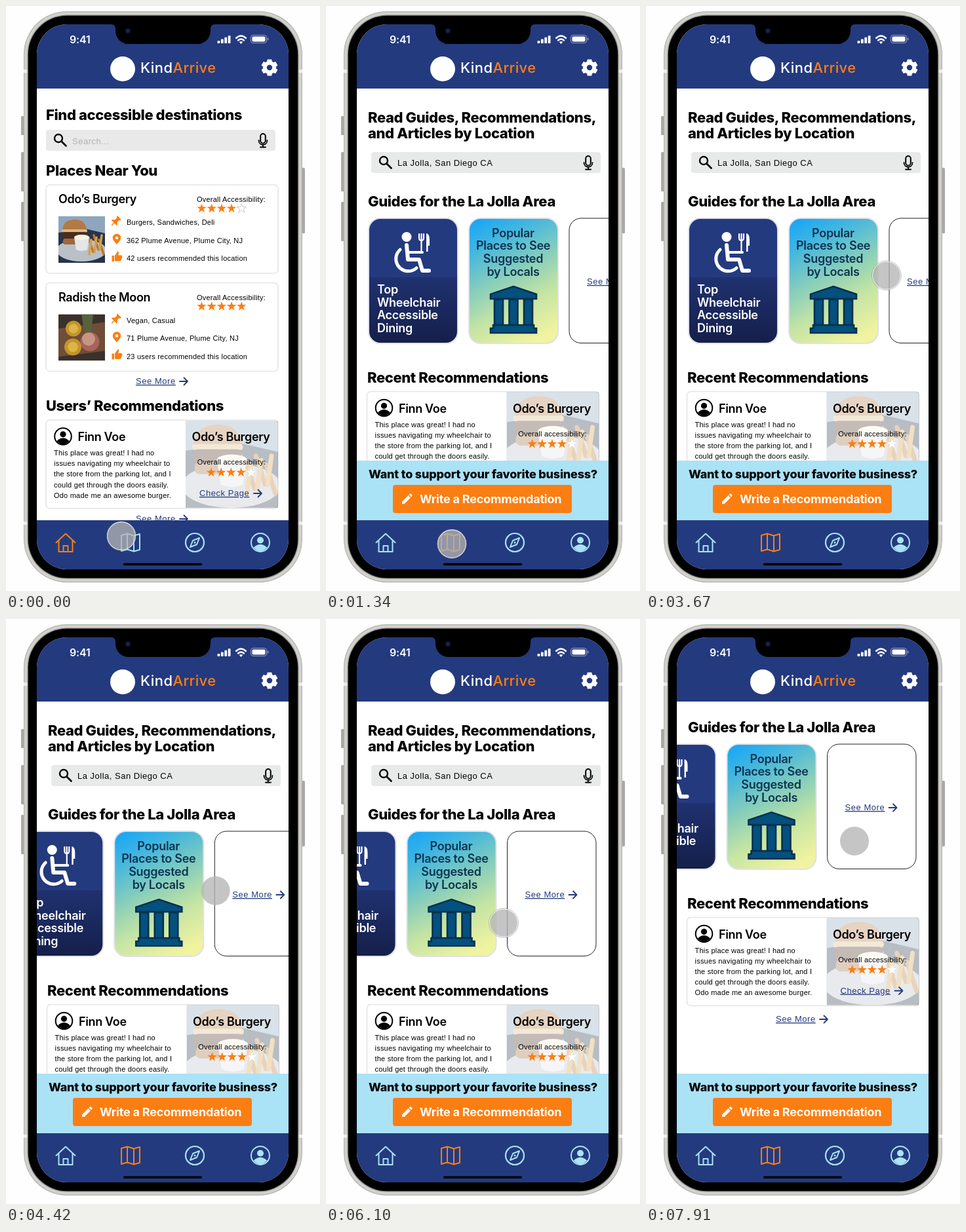
Animation, 479 px wide and 893 px high, one loop 8000 ms. Source, as an HTML page:

```html
<!DOCTYPE html>
<html lang="en">
<head>
<meta charset="utf-8">
<title>Accessible places app</title>
<style>
  html, body { margin: 0; width: 100%; height: 100%; overflow: hidden; background: #fefefe; }
  svg { display: block; width: 479px; height: 893px; }
  text { font: 11px "Liberation Sans", Arial, sans-serif; letter-spacing: .22px; white-space: pre; }
  .h, .t, .c, .cta, .btn, .logo, .clock { font-family: Inter, sans-serif; }
  .h { font-size: 22px; font-weight: 800; letter-spacing: -.4px; }
  .t { font-size: 18px; font-weight: 600; letter-spacing: -.35px; }
  .c { font-size: 18px; font-weight: 600; letter-spacing: -.28px; }
  .cta { font-size: 18px; font-weight: 800; letter-spacing: -.2px; }
  .btn { font-size: 18px; font-weight: 700; letter-spacing: -.2px; }
  .logo { font-size: 22px; font-weight: 500; letter-spacing: .4px; }
  .clock { font-size: 16px; font-weight: 600; letter-spacing: -.2px; }
  .f { font-size: 13px; letter-spacing: .5px; }
  .l { font-size: 13px; letter-spacing: .55px; text-decoration: underline; }
  .m { text-anchor: middle; }
  .line { fill: none; stroke-linecap: round; stroke-linejoin: round; }
</style>
</head>
<body>
<svg id="stage" viewBox="0 0 479 893" xmlns="http://www.w3.org/2000/svg"></svg>
<script>
const BLUE = '#243a7e', ORANGE = '#fb7e12', SKY = '#aae2f6';
const LOOP = 8000, PAGE = 385, FRAME = 130;

// drawing helpers
const text = (x, y, cls, str, fill = '#000') =>
  `<text x="${x}" y="${y}" class="${cls}" fill="${fill}">${str}</text>`;
const lines = (x, y, step, cls, rows, fill) =>
  rows.map((r, i) => text(x, y + i * step, cls, r, fill)).join('');
const rect = (x, y, w, h, r, fill, more = '') =>
  `<rect x="${x}" y="${y}" width="${w}" height="${h}" rx="${r}" fill="${fill}" ${more}/>`;
const circle = (x, y, r, fill, more = '') =>
  `<circle cx="${x}" cy="${y}" r="${r}" fill="${fill}" ${more}/>`;
const path = (d, fill, more = '') => `<path d="${d}" fill="${fill}" ${more}/>`;
const line = (d, color, w = 2, id = '') =>
  `<path id="${id}" d="${d}" class="line" stroke="${color}" stroke-width="${w}"/>`;
const move = (x, y, body, id = '') => `<g id="${id}" transform="translate(${x} ${y})">${body}</g>`;
const times = (n, fn) => Array.from({ length: n }, (_, i) => fn(i)).join('');

const star = (x, y, fill, more) => {
  const points = times(10, i => {
    const r = i % 2 ? 3 : 7.6, a = i * Math.PI / 5;
    return `${x + r * Math.sin(a)},${y - r * Math.cos(a)} `;
  });
  return `<polygon points="${points}" fill="${fill}" ${more}/>`;
};
const stars = (x, y, full, empty = '') =>
  times(5, i => i < full ? star(x + 15.2 * i, y, ORANGE) : star(x + 15.2 * i, y, '#fff', empty));
const link = (x, y, str, w) => text(x, y, 'l', str, BLUE) +
  line(`M${x + w + 6} ${y - 4}h12m-5.5 -5.5l5.5 5.5l-5.5 5.5`, BLUE, 1.8);
const frame = (x, y) => rect(x, y, 354, 135, 6, '#fff', 'stroke="#e5e5e5" stroke-width="1.6"');

// icons
const glass = (x, y) => circle(x - 3, y - 3, 6, 'none', 'stroke="#000" stroke-width="2.4"') +
  line(`M${x + 2} ${y + 2}l6.5 6.5`, '#000', 2.8);
const mic = (x, y) => rect(x - 3.8, y - 10, 7.6, 14.5, 3.8, 'none', 'stroke="#000" stroke-width="2"') +
  line(`M${x - 6.5} ${y}c0 9 13 9 13 0M${x} ${y + 7}v3M${x - 4} ${y + 10.5}h8`, '#000', 1.8);
const person = (x, y, r, color, bg) => circle(x, y, r, bg, `stroke="${color}" stroke-width="2"`) +
  circle(x, y - r * .25, r * .36, color) +
  path(`M${x - r * .74} ${y + r * .55}q${r * .74} ${-r * .7} ${r * 1.48} 0q${-r * .74} ${r * .8} ${-r * 1.48} 0Z`, color);
const pushpin = move(168, 328, `<g transform="rotate(45)">` +
  path('M-4 -7h8v2l-1.5 1v4l3 3v1.5h-11v-1.5l3 -3v-4l-1.5 -1Z', ORANGE) + line('M0 4v5', ORANGE, 1.4) + '</g>');
const marker = path('M169 364c-4 -5 -6.2 -7 -6.2 -10a6.2 6.2 0 0 1 12.4 0c0 3 -2.2 5 -6.2 10Z', ORANGE) +
  circle(169, 354, 2.3, '#fff');
const thumb = rect(161.5, 381, 3.5, 9, 0, ORANGE) +
  path('M166 381l4.5 -6.5q2 0 1.5 2.5l-.7 3.5h5q1.5 1 1 3l-2 5q-.5 1 -2 1h-5.8q-1.5 -.5 -1.5 -1.5Z', ORANGE);

// photo stand-ins
const burger = rect(0, 0, 142, 142, 0, '#26344a') + path('M0 0h142v52l-60 -14l-82 12Z', '#8ea6bd') +
  `<ellipse cx="70" cy="104" rx="76" ry="34" fill="#b9c0c8"/>` +
  times(7, i => line(`M${84 + i * 8} ${58 + i % 3 * 7}l${i % 2 ? 14 : -6} 44`, i % 2 ? '#b9782f' : '#d6a04a', 7)) +
  path('M12 42q2 -32 38 -32q34 0 36 32Z', '#b47a45') + rect(10, 40, 78, 9, 4, '#d9bd82') +
  rect(12, 48, 74, 22, 6, '#4b2c20') + rect(14, 68, 68, 18, 7, '#a0683a') +
  path('M48 64h46l-6 38q-17 8 -34 0Z', '#e4e6ea') + '<ellipse cx="71" cy="64" rx="23" ry="8" fill="#faf4e6"/>';
const roots = rect(0, 0, 142, 142, 0, '#3a312c') + path('M0 44l142 -20v88l-142 18Z', '#6f4d37') +
  path('M70 0h36l-6 56l-20 4Z', '#59613d') +
  circle(96, 84, 29, '#a8645a') + circle(92, 76, 20, '#c89584') +
  [[46, 44, 24], [44, 100, 26]].map(([x, y, r]) => circle(x, y, r, '#c4932c') + circle(x, y, r * .6, '#dcb547')).join('');
const photo = (x, y, body) => `<svg x="${x}" y="${y}" width="71" height="71" viewBox="0 0 142 142">${body}</svg>`;

const place = (y, name, pic, kind, addr, n, rate) => move(0, y,
  frame(61, 273) + text(80, 301, 't', name) + photo(80, 321, pic) +
  text(291, 299, '', 'Overall Accessibility:') +
  stars(298.5, 309, rate, 'stroke="#bbb" stroke-width=".8"') + pushpin + marker + thumb +
  lines(184, 334, 27.5, '', [kind, addr, n + ' users recommended this location']));

const review = frame(61, 632) +
  `<svg x="274" y="633" width="141" height="133" viewBox="0 0 142 142" preserveAspectRatio="xMidYMid slice" opacity=".32">${burger}</svg>` +
  person(87, 657, 12.8, '#000', '#fff') + text(109.5, 664, 't', 'Finn Voe') +
  lines(73, 686, 16.2, '', ['This place was great! I had no', 'issues navigating my wheelchair to',
    'the store from the parking lot, and I', 'could get through the doors easily.',
    'Odo made me an awesome burger.']) +
  text(343, 664, 't m', 'Odo’s Burgery') + text(344, 700, 'm', 'Overall accessibility:') +
  stars(313, 712, 4) + link(295, 748, 'Check Page', 77);

const home = text(61, 174, 'h', 'Find accessible destinations') +
  rect(61, 189, 350, 32, 4, '#e9e9e9') + glass(83, 205) + text(101, 211, 'f', 'Search...', '#b0b0b0') + mic(392, 205) +
  text(61, 259, 'h', 'Places Near You') +
  place(0, 'Odo’s Burgery', burger, 'Burgers, Sandwiches, Deli', '362 Plume Avenue, Plume City, NJ', 42, 4) +
  place(149.5, 'Radish the Moon', roots, 'Vegan, Casual', '71 Plume Avenue, Plume City, NJ', 23, 5) +
  link(198, 577, 'See More', 61) + text(61, 618, 'h', 'Users’ Recommendations') +
  review + link(198, 787, 'See More', 61);

const diner = circle(123, 352.5, 7.5, '#fff') +
  line('M123 365L125 387H142L147 404H157', '#fff', 6) + line('M125 376H147', '#fff', 4) +
  line('M113 372A18 18 0 1 0 138 400', '#fff', 5) +
  line('M142 348v6q0 4 3.5 4q3.5 0 3.5 -4v-6M145.5 348v26', '#fff', 2.2) +
  path('M153 375v-28q5 1 5 9v10h-2.5v9Z', '#fff');
const tile = (x, fill) => rect(x, 324, 136, 191, 18, fill, 'stroke="#dfe1e8" stroke-width="2"');
const dining = tile(65, 'url(#night)') + diner +
  lines(78, 439, 19.7, 'c', ['Top', 'Wheelchair', 'Accessible', 'Dining'], '#fff');
const museum = '<g fill="#04507e" stroke="#06304d" stroke-width="2.6">' +
  '<path d="M251 447v-7l35 -12l35 12v7Z"/>' +
  times(3, i => rect(257 + i * 22.5, 448, 13, 39, 0, '#04507e')) +
  '<path d="M255 487h62v5h4v7h-70v-7h4Z"/></g>';
const sights = tile(218, 'url(#beach)') +
  lines(285.5, 352.5, 19.7, 'c m', ['Popular', 'Places to See', 'Suggested', 'by Locals'], '#0d3350') + museum;
const more = rect(371, 324, 135.5, 190.5, 18, '#fff', 'stroke="#222"') + link(398, 425, 'See More', 61);

const guide = lines(64, 178, 23.5, 'h', ['Read Guides, Recommendations,', 'and Articles by Location']) +
  rect(69, 223, 350, 32, 4, '#e8eaea') + glass(91, 239) + text(109, 244, 'f', 'La Jolla, San Diego CA') + mic(400, 239) +
  text(64, 306, 'h', 'Guides for the La Jolla Area') + move(0, 0, dining + sights + more, 'row') +
  text(63, 575, 'h', 'Recent Recommendations') + move(1.5, -43.5, review) + link(198, 748, 'See More', 61);

const support = rect(47, 694, 384, 91, 0, SKY) +
  text(239.5, 721, 'cta m', 'Want to support your favorite business?') + rect(102, 731, 273, 43, 4, ORANGE) +
  path('M116 760v-3.5l9.5 -9.5l3.5 3.5l-9.5 9.5ZM126.5 746l1.5 -1.5q1 -.6 2 .4l1.3 1.3q.8 1 0 1.8l-1.3 1.5Z', '#fff') +
  text(143, 759, 'btn', 'Write a Recommendation', '#fff');

const gear = move(402, 94, circle(0, 0, 7.2, 'none', 'stroke="#fff" stroke-width="6"') +
  times(6, i => rect(-3.6, -12.5, 7.2, 5, 1.2, '#fff', `transform="rotate(${i * 60})"`)));
const status = text(97, 57, 'clock', '9:41', '#fff') +
  times(4, i => rect(322.5 + i * 5.4, 53 - i * 2.6, 3.8, 4 + i * 2.6, 1, '#fff')) +
  line('M351 49q7.5 -7 15 0M354 52.5q4.5 -4 9 0', '#fff', 2.4) + path('M355.8 55q2.7 -2 5.4 0l-2.7 3Z', '#fff') +
  rect(373.5, 44.5, 24, 12, 3.5, 'none', 'stroke="#fff" stroke-opacity=".5"') +
  rect(375.5, 46.5, 20, 8, 2, '#fff') + rect(398.8, 48.5, 1.5, 4, .7, '#fff', 'opacity=".5"');
const header = rect(47, 28, 384, 98, 0, BLUE) + status + circle(178, 96, 19, '#fff') +
  `<text x="205" y="101.5" class="logo" fill="#fff">Kind<tspan fill="${ORANGE}">Arrive</tspan></text>` + gear;

const nav = rect(47, 785, 384, 76, 0, BLUE) +
  line('M76.5 819L91 805.5L105.5 819M80.5 816v17h21v-17M87.5 833v-9h7v9', ORANGE, 2, 'homeIcon') +
  line('M176 808l9 -2.5l10 3l9 -2.5v24l-9 2.5l-10 -3l-9 2.5ZM185 806v24M195 809v23', SKY, 2, 'mapIcon') +
  circle(288, 819, 14, 'none', `stroke="${SKY}" stroke-width="2.2"`) +
  line('M295 812l-4 10l-10 4l4 -10Z', SKY) + circle(288, 819, 1.5, SKY) +
  person(388, 819, 14, SKY, 'none') + rect(179, 850.5, 120, 3.5, 1.7, '#000');

const button = (x, y, h) => rect(x, y, 5, h, 1.5, '#a9a8a5');
const band = y => rect(27, y, 425, 5, 0, '#efeeec');
const ring = (inset, fill) =>
  rect(27 + inset, 8 + inset, 425 - 2 * inset, 872 - 2 * inset, 66 - inset, fill);
const shell = button(23, 168, 29) + button(23, 223, 60) + button(23, 299, 60) + button(451, 247, 100) +
  ring(0, '#b4b3b0') + ring(1.2, '#d2d1cd') + band(97) + band(787) + ring(5.5, '#8b8a87') + ring(6.8, '#000');
const notch = path('M160 27v1q7 0 7 7v3a20 20 0 0 0 20 20h105a20 20 0 0 0 20 -20v-3q0 -7 7 -7v-1Z', '#000') +
  circle(186, 38, 4.5, '#0c1230') + circle(186, 38, 2, '#1d2d6b');

const stops = list => list.map(([o, c]) => `<stop offset="${o}" stop-color="${c}"/>`).join('');
document.getElementById('stage').innerHTML = `<defs>
  <clipPath id="screen">${rect(47, 28, 384, 832, 46, '#000')}</clipPath>
  <clipPath id="body">${rect(47, 126, 384, 659, 0, '#000')}</clipPath>
  <linearGradient id="night" x2="0" y2="1">${stops([[0, BLUE], [.47, BLUE], [.47, '#1f3170'], [1, '#151f4a']])}</linearGradient>
  <linearGradient id="beach" gradientUnits="userSpaceOnUse" x1="232" y1="322" x2="328" y2="505">${stops([
    [0, '#16a6f8'], [.22, '#45b7dd'], [.5, '#8dd0b8'], [.72, '#c4e4a4'], [1, '#f0f3a0']])}</linearGradient>
  </defs>${shell}<g clip-path="url(#screen)">${rect(47, 28, 384, 832, 0, '#fff')}
  <g clip-path="url(#body)">${move(0, 0, home, 'home')}
    ${move(0, 0, rect(47, 126, 385, 659, 0, '#fff') + move(0, 0, guide, 'scroll') + support, 'guide')}</g>
  ${header}${nav}</g>${notch}
  <g id="cursor">${circle(0, 0, 22, '#b4b4b4', 'opacity=".77"')}
    <g id="ring">${circle(0, 0, 22.3, 'none', 'stroke="#777" stroke-opacity=".55" stroke-width=".9"')}
    ${circle(0, 0, 21.4, 'none', 'stroke="#fff" stroke-opacity=".75" stroke-width="1.1"')}</g></g>`;

// each gesture steps from its first to its last redraw, about one per FRAME
const easeIn = p => p ** 1.4, easeOut = p => 1 - (1 - p) ** 2, linear = p => p;
const smooth = p => p ** 3 * (p * (6 * p - 15) + 10);
const START = { x: 176, y: 809, page: 0, row: 0, scroll: 0 };
const GESTURES = [
  { from: 430, to: 550, ease: linear, end: { x: 182, y: 822 } },
  { from: 830, to: 1310, ease: easeIn, end: { page: 1 } },
  { from: 830, to: 950, ease: linear, end: { x: 192, y: 821 } },
  { from: 2110, to: 2830, ease: smooth, end: { x: 307, y: 463 } },
  { from: 2950, to: 3370, ease: easeOut, end: { x: 347, y: 409 } },
  { from: 3520, to: 3790, ease: easeIn, end: { x: 382, y: 413 } },
  { from: 4040, to: 4670, ease: easeIn, drag: true, end: { x: 272, y: 416, row: 93 } },
  { from: 4820, to: 5140, ease: easeOut, drag: true, end: { x: 206, row: 110 } },
  { from: 5260, to: 5560, ease: linear, end: { row: 94.5 } },
  { from: 6100, to: 6100, ease: linear, end: { x: 271, y: 464 } },
  { from: 6230, to: 6470, ease: easeOut, end: { x: 315, y: 535 } },
  { from: 6720, to: 6840, ease: linear, end: { y: 522 } },
  { from: 6990, to: 7250, ease: linear, drag: true, end: { x: 309, y: 442, scroll: 80 } },
  { from: 7400, to: 7910, ease: easeOut, drag: true, end: { x: 318, y: 339, scroll: 133 } }
];

function stateAt(t) {
  const s = { ...START, drag: false };
  for (const { from, to, ease, drag = false, end } of GESTURES) {
    if (t < from) continue;
    const gaps = Math.round((to - from) / FRAME);
    const step = t >= to ? gaps : Math.floor((t - from) / (to - from) * gaps);
    const p = ease((step + 1) / (gaps + 1));
    for (const key in end) s[key] += (end[key] - s[key]) * p;
    s.drag = drag;
  }
  return s;
}

const mix = (a, b, p) => `color-mix(in srgb, ${a}, ${b} ${p * 100}%)`;
const el = id => document.getElementById(id);
const shift = (id, x, y) => el(id).setAttribute('transform', `translate(${x} ${y})`);

function draw(t) {
  const s = stateAt(t);
  shift('home', -PAGE * s.page, 0);
  shift('guide', PAGE * (1 - s.page), 0);
  shift('row', -s.row, 0);
  shift('scroll', 0, -s.scroll);
  shift('cursor', s.x, s.y);
  el('ring').style.opacity = s.drag ? 0 : 1;
  el('homeIcon').style.stroke = mix(ORANGE, SKY, s.page);
  el('mapIcon').style.stroke = mix(SKY, ORANGE, s.page);
}

const start = performance.now();
function tick() {
  draw((performance.now() - start) % LOOP);
  requestAnimationFrame(tick);
}
tick();
</script>
</body>
</html>
```
